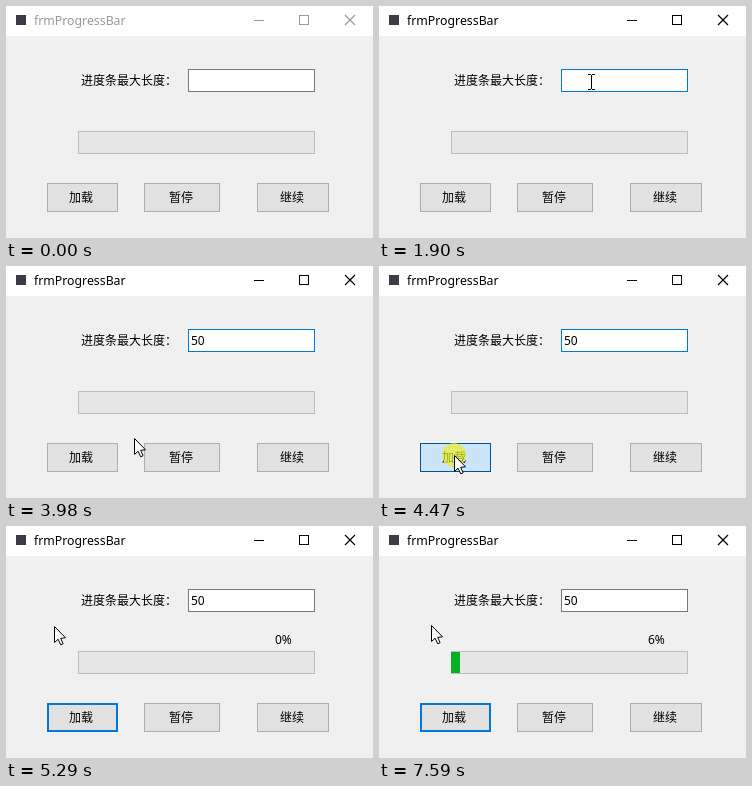
An HTML page with a canvas that plays this animation: 367x232 px, repeating every 8 s.

```html
<!DOCTYPE html>
<html lang="zh">
<head>
<meta charset="utf-8">
<title>frmProgressBar</title>
<style>
html, body { margin: 0; width: 100%; height: 100%; overflow: hidden; background: #f0f0f0; }
canvas { display: block; width: 367px; height: 232px; }
</style>
</head>
<body>
<canvas id="stage" width="367" height="232"></canvas>
<script>
const ctx = document.getElementById('stage').getContext('2d');
const LOOP = 8000, STEP = 69;
const FOCUS = 1210, CARET = 1350, PRESS = 4470, RELEASE = 4540, START = 4632;
const KEYS = [2420, 2750], TYPED = '50', BLINK = 545;
const TICK = 985, BAR_LAG = 460, PERCENT_PER_TICK = 2;
const BLUE = '#0078d7';
const FAMILY = '"Noto Sans", "Noto Sans CJK SC", "Noto Sans CJK", sans-serif';

const field = { x: 182, y: 63, w: 127, h: 23 };
const bar = { x: 72, y: 125, w: 237, h: 23 };
const load = { x: 41, y: 177, w: 71, h: 29, text: '加载' };
const pause = { x: 138, y: 177, w: 76, h: 29, text: '暂停' };
const resume = { x: 251, y: 177, w: 72, h: 29, text: '继续' };

// Pointer strokes: each leaves from wherever the previous one ended.
const entry = { x: 180, y: 212 };
const strokes = [
  { from: 260, to: 605, x: 193, y: 88 },
  { from: 605, to: 950, x: 212, y: 76 },
  { from: 3350, to: 3557, x: 276, y: 70 },
  { from: 3557, to: 3971, x: 128, y: 172 },
  { from: 3971, to: 4250, x: 75, y: 189 },
  { from: 4540, to: 4950, x: 8, y: 132 },
  { from: 4950, to: 5290, x: 48, y: 100 },
  { from: 6890, to: 7240, x: 52, y: 99 }
];

const easeOut = k => k * (2 - k);
const inside = (p, r) => p && p.x >= r.x && p.x < r.x + r.w && p.y >= r.y && p.y < r.y + r.h;

function pointerAt(t) {
  if (t < strokes[0].from) return null;
  let { x, y } = entry;
  for (const s of strokes) {
    if (t < s.from) break;
    const elapsed = Math.floor((t - s.from) / STEP) * STEP;
    const k = t >= s.to ? 1 : easeOut(elapsed / (s.to - s.from));
    x += (s.x - x) * k;
    y += (s.y - y) * k;
  }
  return { x: Math.round(x), y: Math.round(y) };
}

function rect(x, y, w, h, color) {
  ctx.fillStyle = color;
  ctx.fillRect(x, y, w, h);
}

function box({ x, y, w, h }, border, fill, line = 1) {
  rect(x, y, w, h, border);
  rect(x + line, y + line, w - 2 * line, h - 2 * line, fill);
}

function text(str, x, y, color = '#000', size = 12) {
  ctx.font = `${size}px ${FAMILY}`;
  ctx.fillStyle = color;
  ctx.fillText(str, x, y);
}

function button(b, pointer, pressed, focused) {
  const hover = inside(pointer, b);
  const border = pressed ? '#005499' : focused || hover ? BLUE : '#adadad';
  const fill = pressed ? '#cce4f7' : hover ? '#e5f1fb' : '#e1e1e1';
  box(b, border, fill, focused ? 2 : 1);
  text(b.text, b.x + Math.floor(b.w / 2) - 13, 196);
}

function titleBar(active) {
  const ink = active ? '#000' : '#999';
  rect(0, 0, 367, 30, '#fff');
  rect(10, 9, 10, 10, '#3c3c46');
  text('frmProgressBar', 28, 19, ink, 12.3);
  rect(248, 14, 10, 1, ink);
  box({ x: 293, y: 9, w: 10, h: 10 }, ink, '#fff');
  ctx.strokeStyle = ink;
  ctx.lineWidth = 1.2;
  ctx.beginPath();
  ctx.moveTo(339, 9); ctx.lineTo(349, 19);
  ctx.moveTo(349, 9); ctx.lineTo(339, 19);
  ctx.stroke();
}

function textField(t, pointer) {
  const focused = t >= FOCUS && t < RELEASE;
  box(field, focused ? BLUE : inside(pointer, field) ? '#171717' : '#7a7a7a', '#fff');
  const count = KEYS.filter(k => t >= k).length;
  text(TYPED.slice(0, count), field.x + 3, 79);
  const lastChange = count ? KEYS[count - 1] : CARET;
  const sinceChange = t - lastChange;
  if (sinceChange >= 0 && sinceChange < BLINK) rect(field.x + 3 + 7 * count, 66, 1, 17, '#000');
}

function progress(t) {
  const ticksAt = time => Math.max(0, Math.floor((time - START) / TICK));
  const filled = bar.w * ticksAt(t - BAR_LAG) * PERCENT_PER_TICK / 100;
  box(bar, '#bcbcbc', '#e6e6e6');
  rect(bar.x, bar.y + 1, Math.round(filled), bar.h - 2, '#06b025');
  if (t >= START) text(ticksAt(t) * PERCENT_PER_TICK + '%', 269, 118);
}

function clickSpot(x, y) {
  ctx.fillStyle = 'rgba(234, 238, 40, 0.7)';
  ctx.beginPath();
  ctx.arc(x, y, 12, 0, Math.PI * 2);
  ctx.fill();
}

function arrow({ x, y }) {
  const outline = [[0, 0], [0, 16], [3.6, 12.7], [6.2, 18.3], [8.6, 17.2], [6.2, 11.8], [11, 11.3]];
  ctx.beginPath();
  outline.forEach(([dx, dy]) => ctx.lineTo(x + dx + 0.5, y + dy + 0.5));
  ctx.closePath();
  ctx.fillStyle = '#fff';
  ctx.fill();
  ctx.strokeStyle = '#000';
  ctx.lineWidth = 1;
  ctx.stroke();
}

function iBeam({ x, y }) {
  for (const row of [y - 8, y + 7]) {
    rect(x - 3, row, 3, 1, '#000');
    rect(x + 1, row, 3, 1, '#000');
  }
  rect(x, y - 7, 1, 14, '#000');
}

function draw(t) {
  const pointer = pointerAt(t);
  rect(0, 0, 367, 232, '#f0f0f0');
  titleBar(t >= FOCUS);
  text('进度条最大长度：', 75, 79);
  textField(t, pointer);
  progress(t);

  button(load, pointer, t >= PRESS && t < RELEASE, t >= RELEASE);
  button(pause, pointer);
  button(resume, pointer);

  if (t >= FOCUS && t < CARET) clickSpot(212, 75);
  if (t >= PRESS && t < RELEASE + STEP) clickSpot(75, 189);

  const hiddenByTyping = t >= KEYS[0] && t < strokes[2].from;
  if (pointer && !hiddenByTyping) (inside(pointer, field) ? iBeam : arrow)(pointer);
}

const began = performance.now();
function tick() {
  draw((performance.now() - began) % LOOP);
  requestAnimationFrame(tick);
}
tick();
</script>
</body>
</html>
```
